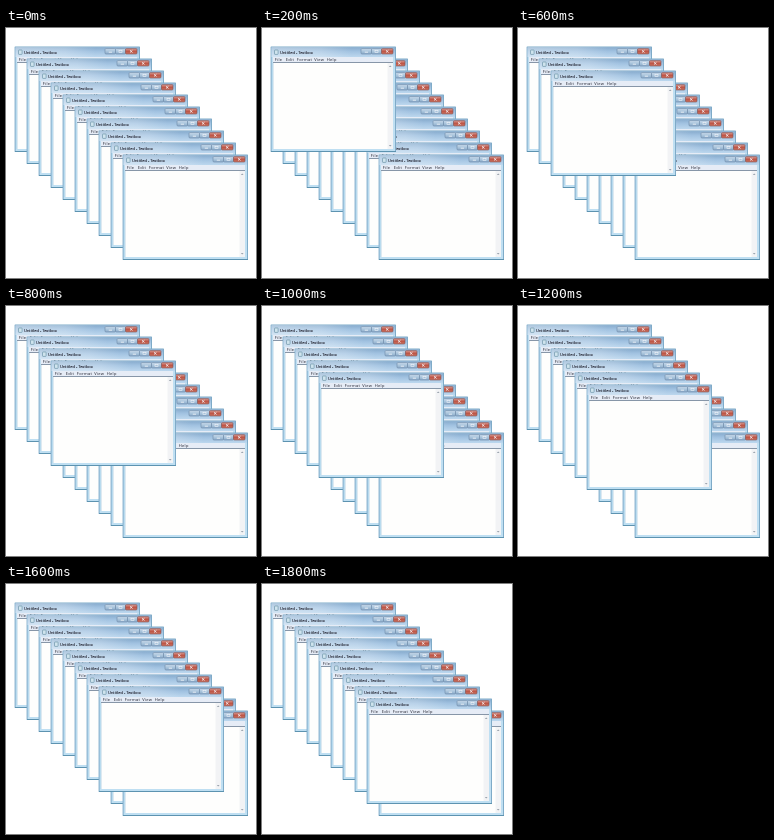
Recreate the animation shown at these times as an HTML page. Size 250 px wide and 250 px high, loop 1.95 s.

```html
<!DOCTYPE html>
<html lang="en">
<head>
<meta charset="utf-8">
<title>Cascading windows</title>
<style>
  html, body { margin: 0; width: 100%; height: 100%; overflow: hidden; background: #fff; }
  svg { display: block; width: 100%; height: 100%; }
  text { font: 4px "Open Sans", sans-serif; fill: #1c1c28; }
  .title { stroke: #1c1c28; stroke-width: .1; }
  .menu { letter-spacing: .35px; }
</style>
</head>
<body>
<svg viewBox="0 0 250 250">
  <defs>
    <linearGradient id="bar" x2="0" y2="1">
      <stop offset="0" stop-color="#87abcd"/>
      <stop offset=".4" stop-color="#a0c1e0"/>
      <stop offset="1" stop-color="#bcd7ee"/>
    </linearGradient>
    <linearGradient id="glow">
      <stop offset="0" stop-color="#fff" stop-opacity=".35"/>
      <stop offset=".4" stop-color="#fff" stop-opacity=".25"/>
      <stop offset=".65" stop-color="#fff" stop-opacity="0"/>
    </linearGradient>
    <linearGradient id="blue" x2="0" y2="1">
      <stop offset="0" stop-color="#c9dcec"/>
      <stop offset="1" stop-color="#8cadcc"/>
    </linearGradient>
    <linearGradient id="red" x2="0" y2="1">
      <stop offset="0" stop-color="#d99c94"/>
      <stop offset=".5" stop-color="#bd5546"/>
      <stop offset="1" stop-color="#cb7362"/>
    </linearGradient>
    <g id="window">
      <rect x=".6" y=".4" width="125.4" height="105.6" rx=".6" fill="#7fabc8"/>
      <rect x="1.6" y="1.4" width="123.4" height="103.6" fill="#bfdff2"/>
      <rect x="1.6" y="1.2" width="123.4" height="9.8" fill="url(#bar)"/>
      <rect x="1.6" y="1.2" width="123.4" height="9.8" fill="url(#glow)"/>
      <rect x="4.5" y="4" width="3.6" height="4.4" rx=".5" fill="#cfe4ee" stroke="#6f95aa" stroke-width=".7"/>
      <text class="title" x="10" y="7.9">Untitled - Textbox</text>

      <g stroke="#6d88a6" stroke-width=".6">
        <rect x="91" y="2.6" width="10.5" height="5.4" rx="1" fill="url(#blue)"/>
        <rect x="101.5" y="2.6" width="10" height="5.4" rx="1" fill="url(#blue)"/>
        <rect x="111.5" y="2.6" width="11.5" height="5.4" rx="1" fill="url(#red)" stroke="#855656"/>
      </g>
      <g fill="none" stroke="#f4f6fa" stroke-width=".8">
        <path d="M94.8 6.2h3.2"/>
        <rect x="105" y="4.4" width="3" height="2" stroke-width=".6"/>
        <path d="M116 4.2l2.5 2.3m0-2.3l-2.5 2.3"/>
      </g>

      <rect x="3" y="11" width="120" height="5" fill="#e6ecf6"/>
      <text class="menu" y="14.9"><tspan x="4.7">File</tspan><tspan x="15.7">Edit</tspan><tspan x="26.8">Format</tspan><tspan x="44.2">View</tspan><tspan x="56.7">Help</tspan></text>

      <rect x="3" y="16" width="120" height="87" fill="#fefefd"/>
      <path d="M3 16.5H123" stroke="#8796a8"/>
      <path d="M3.2 17V103" stroke="#9fc0d8" stroke-width=".5"/>
      <rect x="117.5" y="17" width="5.5" height="86" fill="#f2f3f5"/>
      <path d="M118.8 21l1.4-1.6 1.4 1.6zM118.8 99l1.4 1.6 1.4-1.6z" fill="#9aa3ad"/>
      <path d="M1 105.5H126" stroke="#5d93b0"/>
    </g>
  </defs>
  <g id="stack"></g>
</svg>
<script>
const COUNT = 10, OFFSET = 12, STEP = 200, LOOP = 1950;
const stack = document.getElementById('stack');

const windows = Array.from({ length: COUNT }, (_, i) => {
  const use = document.createElementNS('http://www.w3.org/2000/svg', 'use');
  use.setAttribute('href', '#window');
  use.setAttribute('x', 8 + i * OFFSET);
  use.setAttribute('y', 18 + i * OFFSET);
  return use;
});

// Each step raises the next window of the cascade to the front.
let shown = -1;
function draw(now) {
  const step = Math.floor(now % LOOP / STEP);
  if (step !== shown) {
    shown = step;
    stack.replaceChildren(...windows.slice(step), ...windows.slice(0, step));
  }
}

const start = performance.now();
function tick() {
  draw(performance.now() - start);
  requestAnimationFrame(tick);
}
tick();
</script>
</body>
</html>
```
